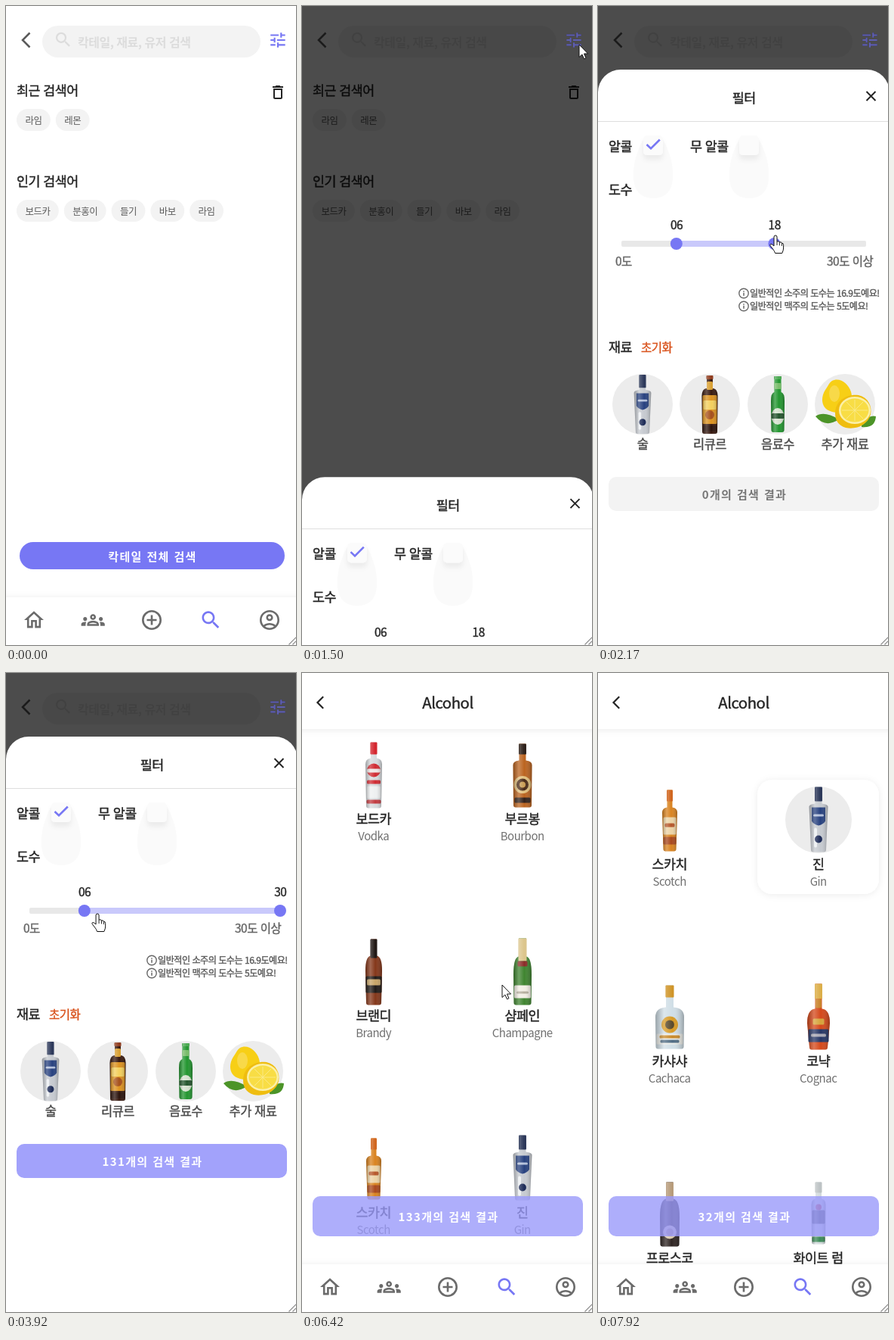
These frames come from a looping animation (384x844 px, 8 s). An HTML page:

```html
<!DOCTYPE html>
<html lang="ko">
<head>
<meta charset="utf-8">
<title>칵테일 검색</title>
<style>
html, body { margin: 0; width: 100%; height: 100%; overflow: hidden; background: #fff; }
svg { display: block; width: 100vw; height: 100vh; }
text { font-family: "Noto Sans CJK KR", "Noto Sans CJK JP", "Noto Sans CJK", sans-serif; white-space: pre; letter-spacing: -.5px; }
.mid { text-anchor: middle; }
.bold { font-weight: 700; letter-spacing: 1.4px; text-anchor: middle; }
</style>
</head>
<body>
<svg id="stage" viewBox="0 0 384 844" xmlns="http://www.w3.org/2000/svg"></svg>
<script>
const LOOP = 8000, FPS = 12;
const PURPLE = '#7777f4', INK = '#242424', GREY = '#6b6b6b';
const TITLE = 17.4, LABEL = 16.5, SMALL = 15.5;

// y is the optical middle of the line
const text = (x, y, s, size, fill, attrs = '') =>
  `<text x="${x}" y="${y + size * .37}" font-size="${size}" fill="${fill}" ${attrs}>${s}</text>`;
const medium = (x, y, s, size, fill, attrs = '') =>
  text(x, y, s, size, fill, `stroke="${fill}" stroke-width=".4" ${attrs}`);
const rect = (x, y, w, h, r, fill, attrs = '') =>
  `<rect x="${x}" y="${y}" width="${w}" height="${h}" rx="${r}" fill="${fill}" ${attrs}/>`;
const circle = (x, y, r, fill, attrs = '') =>
  `<circle cx="${x}" cy="${y}" r="${r}" fill="${fill}" ${attrs}/>`;
const line = (d, color, width) =>
  `<path d="${d}" fill="none" stroke="${color}" stroke-width="${width}"/>`;
const group = (id, body, attrs = '') => `<g id="${id}" ${attrs}>${body}</g>`;
const icon = (name, x, y, scale, fill) =>
  `<path transform="translate(${x} ${y}) scale(${scale})" fill="${fill}" fill-rule="evenodd" d="${ICONS[name]}"/>`;

const ICONS = {
  search: 'M15.5 14h-.79l-.28-.27C15.41 12.59 16 11.11 16 9.5 16 5.91 13.09 3 9.5 3S3 5.91 3 9.5 5.91 16 9.5 16c1.61 0 3.09-.59 4.23-1.57l.27.28v.79l5 4.99L20.49 19l-4.99-5zm-6 0C7.01 14 5 11.99 5 9.5S7.01 5 9.5 5 14 7.01 14 9.5 11.99 14 9.5 14z',
  tune: 'M3 17v2h6v-2H3zM3 5v2h10V5H3zm10 16v-2h8v-2h-8v-2h-2v6h2zM7 9v2H3v2h4v2h2V9H7zm14 4v-2H11v2h10zm-6-4h2V7h4V5h-4V3h-2v6z',
  trash: 'M6 19c0 1.1.9 2 2 2h8c1.1 0 2-.9 2-2V7H6v12zM8 9h8v10H8V9zm7.5-5l-1-1h-5l-1 1H5v2h14V4h-3.5z',
  home: 'M12 5.69l5 4.5V18h-2v-6H9v6H7v-7.81l5-4.5M12 3L2 12h3v8h6v-6h2v6h6v-8h3L12 3z',
  people: 'M4 13c1.1 0 2-.9 2-2s-.9-2-2-2-2 .9-2 2 .9 2 2 2zm1.13 1.1c-.37-.06-.74-.1-1.13-.1-.99 0-1.93.21-2.78.58C.48 14.9 0 15.62 0 16.43V18h4.5v-1.61c0-.83.23-1.61.63-2.29zM20 13c1.1 0 2-.9 2-2s-.9-2-2-2-2 .9-2 2 .9 2 2 2zm4 3.43c0-.81-.48-1.53-1.22-1.85-.85-.37-1.79-.58-2.78-.58-.39 0-.76.04-1.13.1.4.68.63 1.46.63 2.29V18H24v-1.57zm-7.76-2.78c-1.17-.52-2.61-.9-4.24-.9-1.63 0-3.07.39-4.24.9C6.68 14.13 6 15.21 6 16.39V18h12v-1.61c0-1.18-.68-2.26-1.76-2.74zM8.07 16c.09-.23.13-.39.91-.69.97-.38 1.99-.56 3.02-.56s2.05.18 3.02.56c.77.3.81.46.91.69H8.07zM12 8c.55 0 1 .45 1 1s-.45 1-1 1-1-.45-1-1 .45-1 1-1m0-2c-1.66 0-3 1.34-3 3s1.34 3 3 3 3-1.34 3-3-1.34-3-3-3z',
  add: 'M13 7h-2v4H7v2h4v4h2v-4h4v-2h-4V7zM12 2a10 10 0 1 0 0 20a10 10 0 1 0 0-20zm0 2a8 8 0 1 1 0 16a8 8 0 1 1 0-16z',
  user: 'M12 2a10 10 0 1 0 0 20a10 10 0 1 0 0-20zM7.35 18.5C8.66 17.56 10.26 17 12 17s3.34.56 4.65 1.5c-1.31.94-2.91 1.5-4.65 1.5s-3.34-.56-4.65-1.5zm10.79-1.38C16.45 15.8 14.32 15 12 15s-4.45.8-6.14 2.12C4.7 15.73 4 13.95 4 12c0-4.42 3.58-8 8-8s8 3.58 8 8c0 1.95-.7 3.73-1.86 5.12zM12 6c-1.93 0-3.5 1.57-3.5 3.5S10.07 13 12 13s3.5-1.57 3.5-3.5S13.93 6 12 6zm0 5c-.83 0-1.5-.67-1.5-1.5S11.17 8 12 8s1.5.67 1.5 1.5S12.83 11 12 11z'
};

// ---- drinks, drawn around x = 0 with the top at y = 0 ----
const band = (y, h, w, fill) => rect(-w / 2, y, w, h, 1.5, fill);

function bottle(h, w, base, neck, neckEnd, bodyTop, glass, cap, capEnd, labels = '') {
  const a = neck / 2, b = w / 2, c = base / 2;
  const d = `M${-a} 0H${a}V${neckEnd}Q${b} ${neckEnd + 1} ${b} ${bodyTop}L${c} ${h - 3}Q${c} ${h} ${c - 3} ${h}` +
    `H${3 - c}Q${-c} ${h} ${-c} ${h - 3}L${-b} ${bodyTop}Q${-b} ${neckEnd + 1} ${-a} ${neckEnd}Z`;
  return `<path d="${d}" fill="${glass}"/>` + rect(-a - .5, 0, neck + 1, capEnd, 1, cap) + labels +
    `<path d="${d}" fill="url(#gloss)"/>`;
}
const put = (x, y, body, scale = 1) => `<g transform="translate(${x} ${y}) scale(${scale})">${body}</g>`;

const gin = bottle(86, 25, 20, 9, 22, 26, '#c6cad0', '#2a3658', 19,
  '<path d="M-9 27H9V45Q7 49 0 51Q-7 49-9 45Z" fill="#27417f"/>' + band(36, 3, 14, '#b3c0db') +
  rect(-6, 54, 4, 26, 2, '#eceff2') + circle(0, 69, 5, '#1d2b57'));
const liqueur = bottle(77, 21, 20, 8, 17, 27, '#38190f', '#8f3a1c', 5,
  band(8, 11, 8, '#d9a032') + band(26, 38, 19, '#dc921f') + band(33, 12, 17, '#f3cf5c') +
  circle(0, 52, 6, '#a6501a') + band(66, 8, 18, '#2a120b'));
const beer = bottle(74, 18, 17, 9, 21, 33, '#22962f', '#49a850', 4,
  band(9, 8, 9, '#77bb68') + `<ellipse cy="53" rx="8.5" ry="11" fill="#d5e2cf"/>` + band(49, 7, 17, '#24552d'));
const lemon = `
  <path d="M-39 16Q-28 8-8 20Q-26 32-39 16ZM22 26Q32 13 41 16Q40 32 22 30Z" fill="#4c9428"/>
  <path d="M-14-32C-3-35 10-22 9-8C8 7-4 14-17 10C-33 6-32-10-26-19C-21-26-20-31-14-32Z" fill="#f7cf16"/>
  <ellipse cx="-14" cy="-14" rx="7" ry="11" fill="#fff" opacity=".22"/>
  <path d="M-13 12C-13-6 4-14 18-12C31-9 36 3 34 13C31 27 15 34 1 31C-9 28-13 21-13 12Z" fill="#efbd10"/>
  <ellipse cx="13" cy="8" rx="21" ry="18" fill="#fbf0a8"/>
  <ellipse cx="13" cy="8" rx="18.5" ry="15.5" fill="#f8dd45"/>
  ${line('M13-6V22M-4 8H30M2-3L24 19M24-3L2 19', '#faea8c', .9)}`;

const drinks = [
  ['보드카', 'Vodka', 1, bottle(87, 22, 20, 8, 21, 29, '#d6dadd', '#d3222b', 16,
    circle(0, 37, 9, '#d02a32') + band(35, 5, 18, '#f0e6e6') + band(50, 5, 18, '#d02a32') + band(58, 16, 18, '#eef0f1') + band(76, 5, 19, '#c23b40'))],
  ['부르봉', 'Bourbon', 3, bottle(84, 25, 24, 9, 22, 28, '#bb6420', '#2c2019', 14,
    circle(0, 54, 11.5, '#e2c07e') + circle(0, 54, 8, '#4a2a17') + circle(0, 54, 4, '#c99c55') + band(71, 7, 21, '#32211a'))],
  ['브랜디', 'Brandy', 1, bottle(87, 22, 20, 8, 22, 42, '#84371a', '#1d1512', 25,
    band(49, 22, 21, '#1f1a17') + band(53, 8, 18, '#c7a468'))],
  ['샴페인', 'Champagne', 0, bottle(88, 24, 23, 10, 24, 48, '#3f8430', '#dcc58b', 30,
    band(30, 7, 13, '#8b2b28') + band(62, 17, 22, '#f2eee4') + band(70, 3, 16, '#b5ae9e'))],
  ['스카치', 'Scotch', 4, bottle(81, 20, 17, 7, 23, 30, '#d98320', '#d0641c', 15,
    band(36, 23, 17, '#ecd3a5') + band(44, 5, 13, '#b65629') + band(62, 10, 17, '#a9481c'))],
  ['진', 'Gin', 0, gin],
  ['카샤샤', 'Cachaca', 2, bottle(84, 38, 37, 10, 29, 42, '#d0dee6', '#cf9427', 16,
    circle(0, 52, 11, '#d79a25') + circle(0, 52, 6, '#5a4a2c') + band(64, 14, 35, '#edeee9') + band(66, 4, 27, '#c98a2a') + band(72, 4, 25, '#506c84'))],
  ['코냑', 'Cognac', 0, bottle(87, 30, 24, 9, 33, 52, '#d4481a', '#dcae48', 20,
    band(20, 12, 8, '#c9822a') + band(46, 8, 15, '#d6a33a') + band(60, 17, 27, '#253565') + band(66, 4, 20, '#a9a8b4'))],
  ['프로스코', 'Prosecco', 2, bottle(85, 26, 25, 9, 22, 46, '#2f2523', '#b79b7a', 25,
    circle(0, 66, 9, '#d9c9ad') + circle(0, 66, 5, '#a48c72'))],
  ['화이트 럼', 'White Rum', 2, bottle(82, 19, 18, 8, 22, 30, '#d3dadc', '#bcc2c4', 14,
    band(37, 18, 17, '#4c545d') + circle(0, 33, 4, '#b8414a') + band(72, 7, 17, '#3d8a59'))]
];

// ---- screens ----
function chips(y, words) {
  let x = 14;
  return words.map(s => {
    const w = 22.8 + 11 * s.length;
    const out = rect(x, y, w, 29, 14.5, '#f3f3f3') + text(x + w / 2, y + 15, s, 12.5, '#5c5c5c', 'class="mid"');
    x += w + 7;
    return out;
  }).join('');
}

const home = rect(0, 0, 384, 844, 0, '#fff') +
  line('M31.5 35.5L22 45L31.5 54.5', '#5a5a5a', 2.5) +
  rect(48, 26, 289, 42, 21, '#f3f3f3') + icon('search', 62.8, 31.6, 1.08, '#dcdcdc') +
  text(95, 48, '칵테일, 재료, 유저 검색', 16, '#dcdcdc', 'font-weight="700"') +
  icon('tune', 347, 32, 1.08, PURPLE) +
  medium(14, 111.5, '최근 검색어', TITLE, INK) + icon('trash', 348, 102, 1, INK) +
  chips(136, ['라임', '레몬']) +
  medium(14, 231.5, '인기 검색어', TITLE, INK) +
  chips(256, ['보드카', '분홍이', '들기', '바보', '라임']) +
  rect(18, 708, 351, 36, 18, PURPLE) +
  text(194, 727, '칵테일 전체 검색', 15, '#fff', 'class="bold"');

const nav = rect(-10, 781, 404, 80, 0, '#fff', 'filter="url(#soft)"') +
  icon('home', 21.4, 795.4, 1.3, GREY) + icon('people', 99.6, 795.4, 1.3, GREY) +
  icon('add', 177.4, 795.4, 1.3, GREY) + icon('search', 255.6, 795.4, 1.3, PURPLE) +
  icon('user', 333.4, 795.4, 1.3, GREY);

const checkbox = x => put(x, 171,
  `<path d="M-13 5C-23 24-27 40-26 57C-25 74-15 83 0 83C15 83 25 74 26 57C27 40 23 24 13 5Z" fill="#fafafa"/>` +
  rect(-13, 0, 26, 26, 5, '#fbfbfb', 'filter="url(#drop)"'));
const note = (y, s) => circle(193, y - .5, 6.2, 'none', 'stroke="#666" stroke-width="1.4"') +
  line(`M193 ${y - 1.2}V${y + 2.8}M193 ${y - 3.8}V${y - 2.3}`, '#666', 1.5) + medium(201, y, s, 12.1, '#5c5c5c');
const pick = (x, s) => circle(x, 526, 40, '#ececec') + medium(x, 579, s, LABEL, '#4a4a4a', 'class="mid"');
const thumb = id => group(id, circle(0, 314, 8, PURPLE) + medium(.3, 289, '', SMALL, INK, 'class="mid"'));

const sheet = rect(0, 84, 386, 800, 30, '#fff') +
  medium(193.3, 121.5, '필터', TITLE, INK, 'class="mid"') +
  line('M355.5 113L367.5 125M367.5 113L355.5 125', INK, 2) + line('M0 152.5H384', '#dedede', 1) +
  checkbox(73) + checkbox(200) + line('M64.5 183L70 188.2L81.8 176.5', PURPLE, 2.6) +
  medium(14, 185.5, '알콜', TITLE, INK) + medium(122, 185.5, '무 알콜', TITLE, INK) +
  medium(14, 242.5, '도수', TITLE, INK) +
  rect(31, 310, 324, 8, 2, '#e8e8e8') + `<rect id="range" y="310" height="8" fill="#c9c9fb"/>` +
  thumb('low') + thumb('high') +
  medium(23, 337.5, '0도', SMALL, '#666') + medium(303, 337.5, '30도 이상', SMALL, '#666') +
  note(380, '일반적인 소주의 도수는 16.9도예요!') + note(397, '일반적인 맥주의 도수는 5도예요!') +
  medium(14, 450.5, '재료', TITLE, INK) + medium(57, 451, '초기화', SMALL, '#d9541e') +
  pick(59, '술') + pick(148, '리큐르') + pick(238, '음료수') + pick(327, '추가 재료') +
  put(59, 487, gin, .91) + put(148, 488, liqueur) + put(238, 489, beer) + put(327, 526, lemon) +
  `<rect id="find" x="14" y="622" width="358" height="45" rx="10"/>` +
  text(194, 645, '', 15, '#fff', 'class="bold" id="found"');

const list = group('chosen',
  rect(211, 601, 161, 151, 20, '#fff', 'filter="url(#soft)"') + circle(292, 654, 44, '#ececec')) +
  drinks.map(([ko, en, dy, art], i) => {
    const x = i % 2 ? 292 : 95, y = 260 * (i >> 1);
    return put(x, 90.5 + y + dy, art) +
      medium(x - .3, 192.5 + y, ko, TITLE, INK, 'class="mid"') +
      text(x - .3, 215.5 + y, en, 15, '#707070', 'class="mid"');
  }).join('');

const alcohol = rect(0, 0, 384, 844, 0, '#fff') + group('list', list) +
  rect(-10, -20, 404, 94, 0, '#fff', 'filter="url(#soft)"') +
  line('M28.2 31.3L20.5 39L28.2 46.7', INK, 2.2) +
  medium(193, 39, 'Alcohol', 20.4, INK, 'class="mid"') +
  rect(14, 691, 358, 53, 10, '#9a9afb', 'opacity=".8"') +
  text(194, 718.5, '', 15, '#fff', 'class="bold" id="total"');

const stage = document.getElementById('stage');
stage.innerHTML = `<defs>
  <linearGradient id="gloss"><stop offset="0" stop-opacity=".26"/><stop offset=".3" stop-color="#fff" stop-opacity=".25"/>
  <stop offset=".6" stop-color="#fff" stop-opacity="0"/><stop offset="1" stop-opacity=".28"/></linearGradient>
  <filter id="soft" x="-20%" y="-30%" width="140%" height="160%"><feDropShadow dx="0" dy="1" stdDeviation="5" flood-opacity=".08"/></filter>
  <filter id="drop" x="-60%" y="-60%" width="220%" height="240%"><feDropShadow dx="0" dy="6" stdDeviation="3" flood-opacity=".06"/></filter>
  </defs>` +
  group('home', home) + group('alcohol', alcohol) + group('nav', nav) +
  group('shade', rect(0, 0, 384, 844, 0, '#000', 'opacity=".7"') + icon('tune', 347, 32, 1.08, '#5f5fb0')) +
  group('sheet', sheet) +
  line('M374.5 843.5L384 834M379.5 843.5L384 839', '#8a8a8a', 1.1) +
  group('arrow', '<path d="M0 0V16.5L3.9 13L6.5 18.8L9 17.7L6.5 12H11.6Z"/>', 'fill="#fff" stroke="#111"') +
  group('hand', '<path d="M-2 2Q-2 0 0 0Q2 0 2 2V8Q5 7 5.4 9Q8 8.2 8.4 10.4Q10.6 10 10.6 12.6V17Q10.6 19.5 8.8 23.5H-.4Q-1.2 20.5-4.2 17Q-8.4 12.4-6.6 11.6Q-4.6 11-2 14Z"/>' +
    line('M2 8V13M5.4 9V13.4M8.4 10.4V14', '#111', .9), 'fill="#fff" stroke="#111"');

// ---- motion ----
const $ = id => document.getElementById(id);
const show = (id, on) => $(id).setAttribute('display', on ? 'inline' : 'none');
const move = (id, x, y) => $(id).setAttribute('transform', `translate(${x} ${y})`);
const span = (t, a, b) => Math.min(1, Math.max(0, (t - a) / (b - a)));
const smooth = p => p * p * (3 - 2 * p);
const pad = n => String(n).padStart(2, '0');

// time, x, y of the pointer tip
const path = [
  [400, 250, 210], [1000, 367, 51], [1560, 367, 51], [1960, 235, 303], [2200, 235, 303],
  [2950, 365, 306], [3420, 365, 306], [3580, 348, 309], [3920, 121, 318], [3990, 106, 317],
  [4180, 41, 317], [4420, 42, 530], [4800, 45, 517], [5300, 45, 517], [5600, 58, 537],
  [5830, 58, 537], [6060, 265, 412], [7050, 265, 412], [7260, 290, 175]
];

function pointer(t) {
  const i = path.findIndex(p => p[0] > t);
  if (i < 1) return i ? path[path.length - 1].slice(1) : path[0].slice(1);
  const [t0, x0, y0] = path[i - 1], [t1, x1, y1] = path[i];
  const p = smooth(span(t, t0, t1));
  return [x0 + (x1 - x0) * p, y0 + (y1 - y0) * p];
}

function setThumb(id, value) {
  const x = 39 + value * 10.8;
  move(id, x, 0);
  $(id).querySelector('text').textContent = pad(value);
  return x;
}

function draw(t) {
  const listing = t >= 5830;
  show('home', !listing);
  show('alcohol', listing);
  show('shade', t >= 1160 && !listing);
  show('sheet', t >= 1450 && !listing);
  $('shade').setAttribute('opacity', span(t, 1100, 1400));
  move('sheet', 0, 760 * (1 - span(t, 1450, 1910)) ** 3);

  const low = setThumb('low', Math.round(6 - 6 * smooth(span(t, 3990, 4180))));
  const high = setThumb('high', Math.round(18 + 12 * smooth(span(t, 2200, 2950))));
  $('range').setAttribute('x', low);
  $('range').setAttribute('width', high - low);

  const count = t < 3300 ? 0 : t < 4560 ? 131 : t < 7550 ? 133 : 32;
  $('find').setAttribute('fill', count ? '#a2a2fb' : '#f3f3f3');
  $('found').setAttribute('fill', count ? '#fff' : '#777');
  $('found').textContent = $('total').textContent = count + '개의 검색 결과';

  move('list', 0, -460 * smooth(span(t, 6450, 7050)));
  show('chosen', t >= 7320);

  const [x, y] = pointer(t);
  const hand = (t >= 1900 && !listing) || t >= 7200;
  const visible = t >= 400 && t < 7880;
  show('hand', visible && hand);
  show('arrow', visible && !hand);
  move('hand', x, y);
  move('arrow', x, y);
}

// the picture advances in even steps, like a screen recording
const start = performance.now();
function tick(now) {
  const t = Math.max(0, now - start) % LOOP;
  draw(Math.floor((t + 4) * FPS / 1000) * 1000 / FPS);
  requestAnimationFrame(tick);
}
draw(0);
requestAnimationFrame(tick);
</script>
</body>
</html>
```
